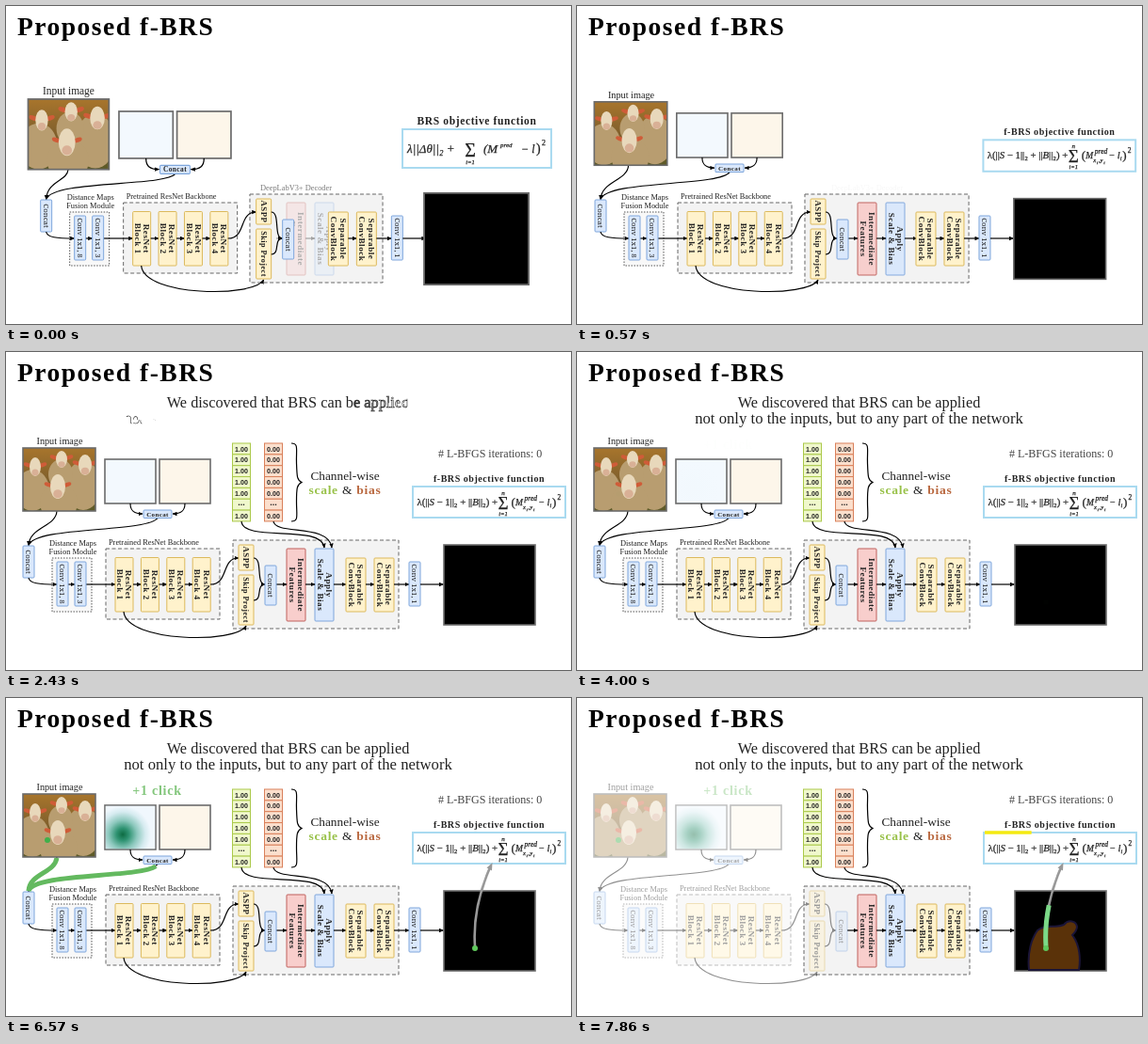
An HTML page that plays this animation: 600 px wide and 338 px high, repeating every 8 s.

```html
<!DOCTYPE html>
<html lang="en">
<head>
<meta charset="utf-8">
<title>Proposed f-BRS</title>
<style>
html, body { margin: 0; width: 100%; height: 100%; overflow: hidden; background: #fff; }
svg { display: block; width: 100vw; height: 100vh; }
text { font-family: "Liberation Serif", serif; fill: #222; white-space: pre; }
.n { font-family: "Noto Serif", serif; }
.b { font-weight: 700; letter-spacing: .055em; }
.m { text-anchor: middle; }
.i { font-style: italic; }
.math text { stroke: #222; stroke-width: .25; }
.yellow { fill: #fff2cc; stroke: #dcb95c; }
.blue { fill: #dae8fc; stroke: #7ea6dc; }
.red { fill: #f8cecc; stroke: #c0605c; }
.area { fill: #f3f3f3; stroke: #666; stroke-dasharray: 4 2.5; }
.dots { fill: #f8f8f8; stroke: #555; stroke-dasharray: 1.5 1.5; }
.frame { stroke: #6b6b6b; stroke-width: 1.6; }
.edge { fill: none; stroke: #000; stroke-width: 1.2; }
.flash { fill: none; stroke: #63b95f; stroke-width: 5; }
</style>
</head>
<body>
<svg id="stage" viewBox="0 0 600 338"></svg>
<script>
const LOOP = 8000;
const text = (s, x, y, size, cls = '', attrs = '') =>
  `<text x="${x}" y="${y}" font-size="${size}" class="${cls}" ${attrs}>${s}</text>`;
const rect = (x, y, w, h, cls, attrs = '') =>
  `<rect x="${x}" y="${y}" width="${w}" height="${h}" class="${cls}" ${attrs}/>`;
const ellipse = (x, y, rx, ry, fill, turn = 0) =>
  `<ellipse rx="${rx}" ry="${ry}" fill="${fill}" transform="translate(${x} ${y}) rotate(${turn})"/>`;
const edge = (d, id = '') => `<path id="${id}" class="edge" marker-end="url(#tip)" d="${d}"/>`;
const group = (id, body, attrs = '') => `<g id="${id}" ${attrs}>${body}</g>`;

// Box whose lines of text run downwards
const block = (x, y, w, h, cls, lines, font = 'b', size = 9.2) =>
  rect(x, y, w, h, cls, 'rx="1"') +
  `<g transform="translate(${x + w / 2} ${y + h / 2}) rotate(90)">` +
  lines.map((s, i) => text(s, 0, 2.7 + (i - (lines.length - 1) / 2) * 9.3, size, font + ' m')).join('') +
  '</g>';

const photo = '<g clip-path="url(#photoClip)">' + rect(0, 0, 77, 67, '', 'fill="url(#field)"') +
  [[10, 45, 18, 22], [64, 40, 19, 26], [40, 28, 13, 16], [38, 58, 20, 20]]
    .map(([x, y, rx, ry]) => ellipse(x, y, rx, ry, '#b89d70')).join('') +
  [[13, 20, 6, 10], [41, 12, 6, 9], [66, 18, 7, 11], [37, 41, 8, 13]].map(([x, y, rx, ry]) =>
    ellipse(x - rx - 2, y - 2, 4.5, 2.2, '#cf5c38', 20) + ellipse(x + rx + 2, y - 2, 4.5, 2.2, '#cf5c38', -20) +
    ellipse(x, y, rx, ry, '#e8d8bb') + ellipse(x, y + ry * .6, rx * .6, ry * .35, '#d9b096')).join('') +
  '</g>' + rect(0, 0, 77, 67, 'frame', 'fill="none"');

const maps =
  rect(105, 114, 54, 47, 'frame', 'fill="#f3f9fe"') + rect(163, 114, 54, 47, 'frame', 'fill="#fdf6ea"') +
  group('distance', rect(105.8, 114.8, 52.4, 45.4, '', 'fill="url(#halo)"')) +
  rect(146, 168, 30, 8.5, 'blue', 'rx="1"') + text('Concat', 161, 174.6, 7, 'b m') +
  edge('M132 161C132 169 136 172 145 172') + edge('M190 161C190 169 186 172 177 172');

const network =
  block(18, 206, 12, 34, 'blue', ['Concat'], 'n', 7.8) +
  rect(49, 219, 42, 57, 'dots') +
  text('Distance Maps', 71, 206, 8.4, 'm') + text('Fusion Module', 71, 214.5, 8.4, 'm') +
  rect(106, 209, 121, 75, 'area') + text('Pretrained ResNet Backbone', 109, 205, 8.3) +
  edge('M24 240C25 246 35 247 54 247') + edge('M66 247H73') + edge('M85 247H116') +
  block(54, 223, 12, 47, 'blue', ['Conv 1x1, 8'], 'n', 7.8) +
  block(73, 223, 12, 47, 'blue', ['Conv 1x1, 3'], 'n', 7.8) +
  [0, 1, 2, 3].map(i => {
    const x = 116 + 27.4 * i;
    return block(x, 218.5, 19, 57.5, 'yellow', ['ResNet', 'Block ' + (i + 1)]) +
      (i < 3 ? edge(`M${x + 19} 247H${x + 27.4}`) : '');
  }).join('') +
  edge('M217 247C237 247 228 219 247 219') + edge('M125 276C128 309 245 310 255 291') +
  block(247, 205, 16, 27, 'yellow', ['ASPP'], 'b', 8.8) +
  block(247, 237, 16, 53, 'yellow', ['Skip Project'], 'b', 8.2) +
  edge('M263 219C273 219 265 247 275 247') + edge('M263 264C273 264 265 247 275 247') +
  block(275, 227, 12, 42, 'blue', ['Concat'], 'n', 7.8);

const scaleBias =
  block(298, 209, 20, 77, 'red', ['Intermediate', 'Features']) +
  block(328, 209, 20, 77, 'blue', ['Apply', 'Scale &amp; Bias']) +
  edge('M287 247H298') + edge('M318 247H328') + edge('M348 247H361');

const head =
  block(361, 219, 21, 57, 'yellow', ['Separable', 'ConvBlock']) + edge('M382 247H391') +
  block(391, 219, 21, 57, 'yellow', ['Separable', 'ConvBlock']) + edge('M412 247H428') +
  block(428, 223, 12, 47, 'blue', ['Conv 1x1, 1'], 'n', 7.8) + edge('M440 247H464.5');

const column = (x, value, fill, stroke) => [...Array(7).keys()].map(i => {
  const y = 97 + 11.85 * i;
  return rect(x, y, 19, 11.85, '', `fill="${fill}" stroke="${stroke}"`) +
    text(i == 5 ? '...' : value, x + 9.5, y + (i == 5 ? 6.6 : 8.5), i == 5 ? 9 : 7.1, 'm',
      'style="font-family:\'Liberation Sans\',sans-serif;font-weight:700"');
}).join('');
const channels =
  column(240.5, '1.00', '#f0f8cc', '#abc94a') + column(274.5, '0.00', '#fbdfcd', '#d9805a') +
  '<path class="edge" d="M303 97C311 97 308 103 308.5 118S309 136 314 138.5C309 141 308.5 144 308.5 159S311 180 303 180"/>' +
  text('Channel-wise', 360, 136, 13.3, 'm') +
  text('<tspan fill="#98c148">scale</tspan><tspan font-weight="400"> &amp; </tspan><tspan fill="#b9683f">bias</tspan>', 360, 151, 13.5, 'b m') +
  edge('M250 180C252 203 335 182 338 208') + edge('M284 180C286 195 343 182 346 208') +
  text('# L-BFGS iterations: 0', 459, 112, 12, '', 'fill-opacity=".85"');

const sum = '<g class="math">' +
  text('λ(||<tspan class="i">S</tspan> − 1||₂ + ||<tspan class="i">B</tspan>||₂) +', 436.5, 163, 10.7) +
  text('Σ', 528, 167, 19, 'm') + text('n', 528, 151.5, 7, 'i m') + text('i=1', 528, 173.5, 6.5, 'i m') +
  text('(', 536.5, 163.5, 13) + text('M', 541, 163, 9.5, 'i') + text('pred', 550.5, 158, 7.5, 'i') +
  text('x', 549, 167, 6.5, 'i') + text('i', 552.5, 168.5, 5, 'i') + text(',y', 554.5, 167, 6.5, 'i') + text('i', 560, 168.5, 5, 'i') +
  text('−', 566, 163, 10) + text('l', 574.5, 163, 10.5, 'i') + text('i', 577.5, 165, 6.5, 'i') +
  text(')', 580, 163.5, 13) + text('2', 585.5, 156.5, 7.5) + '</g>';
const oldSum = '<g class="math">' + text('λ||Δθ||₂ +', 426, 156, 13, 'i') +
  text('Σ', 493, 160, 20, 'm') + text('i=1', 493, 168, 6.5, 'i m') +
  text('(M', 507, 156, 13, 'i') + text('pred', 525, 150, 7, 'i') + text('− l', 547, 156, 12, 'i') +
  text(')', 563, 156, 14) + text('2', 569, 148, 8) + '</g>';

const writing = [['We discovered that BRS can be applied', 59, 16.3],
  ['not only to the inputs, but to any part of the network', 76, 16.7]]
  .map(([s, y, size]) => text([...s].map(c => `<tspan${c == ' ' ? '' : ' class="pen"'}>${c}</tspan>`).join(''), 299.5, y, size, 'm')).join('');

const flash = (d, from, to) => `<path class="flash" pathLength="1" d="${d}" data-from="${from}" data-to="${to}"/>`;
const LINK = 'M498 264C496 235 503 205 514.5 179';
const flashes =
  flash('M54 169C53 186 25 186 24 205', 6250, 6880) + flash('M161 177C150 192 30 185 24 205', 6250, 6880) +
  flash('M24 240C25 246 35 247 54 247H217', 6760, 7080) +
  flash('M217 247C237 247 228 219 247 219', 6980, 7150) + flash('M125 276C128 309 245 310 255 291', 6900, 7150) +
  flash('M263 219C273 219 265 247 275 247H464', 7080, 7350) +
  flash('M263 264C273 264 265 247 275 247', 7080, 7250);

const stage = document.getElementById('stage');
stage.innerHTML = `<defs>
  <marker id="tip" markerUnits="userSpaceOnUse" markerWidth="5" markerHeight="5" refX="4.5" refY="2.5" orient="auto"><path d="M0 .3L5 2.5L0 4.7Z"/></marker>
  <clipPath id="photoClip"><path d="M0 0H77V67H0Z"/></clipPath>
  <linearGradient id="field" x2="0" y2="1"><stop stop-color="#a8752c"/><stop offset=".5" stop-color="#80602c"/><stop offset="1" stop-color="#5c5a28"/></linearGradient>
  <radialGradient id="halo" gradientUnits="userSpaceOnUse" cx="124" cy="145" r="30"><stop stop-color="#0d6b42"/><stop offset=".22" stop-color="#2f9372"/><stop offset=".5" stop-color="#8cc8bd"/><stop offset=".8" stop-color="#d6ebf0"/><stop offset="1" stop-color="#f0f7fd"/></radialGradient>
  </defs>` +
  text('Proposed f-BRS', 12, 31, 27.5, 'b', 'style="fill:#000"') +
  rect(241, 200, 176, 94, 'area', 'id="decoder"') +
  text('DeepLabV3+ Decoder', 308, 196, 8.4, 'm', 'id="decoderName"') +
  group('scaleBias', scaleBias) +
  group('inputs', edge('', 'photoEdge') + edge('', 'mapsEdge') +
    group('photo', photo) + text('Input image', 57, 98, 10.2, 'm', 'id="photoName"') +
    group('maps', maps) + group('network', network) +
    group('click', text('+1 click', 160.5, 103, 14, 'b m', 'style="fill:#83c67c"') +
      '<circle cx="44" cy="151" r="3" fill="#3fb04a"/>')) +
  group('head', head) + group('channels', channels) +
  group('output', rect(465, 205, 97, 85, 'frame', 'fill="#000"') +
    group('mask', '<path fill="#5a3209" stroke="#1b1538" stroke-width="2" d="M480 289C478 270 483 255 489 247C497 240 508 245 517 241C522 235 530 237 531 243C531 247 528 250 526 252C534 262 535 278 533 289Z"/>')) +
  rect(0, 0, 0, 0, '', 'id="lossBox" fill="#fff" stroke="#a9daf0" stroke-width="2"') +
  group('newLoss', text('f-BRS objective function', 513, 138, 10, 'b m') + sum) +
  group('oldLoss', text('BRS objective function', 500, 126, 11.5, 'b m') + oldSum) +
  writing + flashes +
  `<path id="link" fill="none" stroke="#999" stroke-width="2.6" pathLength="1" d="${LINK}"/>
  <path id="linkTip" fill="#999" d="M516.5 175L516 183.5L510.5 180.5Z"/>` +
  flash(LINK, 7660, 8460).replace('/>', ' style="stroke:#7bd987"/>') +
  '<circle id="dot" cx="498" cy="266" r="3" fill="#5fc75c"/>' +
  '<path id="outline" fill="none" stroke="#f4ea12" stroke-width="3.5" pathLength="390" d="M433 143H594V176H433Z"/>';

const $ = id => document.getElementById(id);
const clamp = v => Math.min(1, Math.max(0, v));
const sigmoid = x => 1 / (1 + Math.exp(-x));
const smooth = v => {
  const e = sigmoid(-5);
  return clamp((sigmoid(10 * (clamp(v) - .5)) - e) / (1 - 2 * e));
};
const ramp = (t, a, b) => smooth((t - a) / (b - a));
const fade = (id, v) => $(id).setAttribute('opacity', v);
const move = (id, s) => $(id).setAttribute('transform', s);
const pens = [...document.querySelectorAll('.pen')];
const flashPaths = [...document.querySelectorAll('.flash')];

function layout(t) {
  const p = smooth(.43 + t / 1500), p0 = smooth(.43);
  const k = (1 - p) / (1 - p0); // 1 = early arrangement, 0 = settled
  const dx = 18.7 * k;
  move('network', `translate(${dx})`);
  move('head', `translate(${-dx})`);
  move('photo', `translate(${18 + 5.5 * k} ${102 - 3 * k}) scale(${1 + .115 * k})`);
  move('photoName', `translate(${57 + 9.5 * k} ${98 - 4 * k}) scale(${1 + .12 * k}) translate(-57 -98)`);
  move('maps', `translate(${105 + 15 * k} ${114 - 2 * k}) scale(${1 + .0625 * k}) translate(-105 -114)`);
  move('output', `translate(${513.5 - 14 * k} 247.5) scale(${1 + .145 * k}) translate(-513.5 -247.5)`);
  $('photoEdge').setAttribute('d', `M${54 + 12 * k} ${169 + 5 * k}C${53 + 12 * k} 186 ${25 + dx} 186 ${24 + dx} 205.5`);
  $('mapsEdge').setAttribute('d', `M${161 + 19 * k} ${176.5 + 2 * k}C${150 + 19 * k} 192 ${30 + dx} 185 ${24 + dx} 205.5`);
  $('decoder').setAttribute('x', 241 + 18 * k);
  $('decoder').setAttribute('width', 176 - 35 * k);
  fade('decoderName', (1 - p) * .9);
  fade('scaleBias', p);
  const box = { x: 432 - 11 * k, y: 143 - 12 * k, width: 162 - 4 * k, height: 33 + 8 * k };
  for (const key in box) $('lossBox').setAttribute(key, box[key]);
  move('newLoss', `translate(${-13 * k} ${-10 * k})`);
  move('oldLoss', `translate(${13 * (1 - k)} ${10 * (1 - k)})`);
  fade('newLoss', clamp((p - .35) / .4));
  fade('oldLoss', clamp((.75 - p) / .4));
}

function write(t) {
  const lag = 12, pos = (t - 1730) / 1770 * (pens.length + lag);
  pens.forEach((pen, i) => {
    const u = clamp((pos - i) / lag);
    pen.style.fillOpacity = clamp(u * 2 - 1);
    pen.style.stroke = u > 0 && u < 1 ? '#222' : 'none';
    pen.style.strokeWidth = .6;
    pen.style.strokeDasharray = `${u * 50} 90`;
  });
}

function draw(now) {
  const t = now % LOOP;
  layout(t);
  write(t);
  fade('channels', ramp(t, 800, 1500));

  const click = ramp(t, 3950, 4750), link = ramp(t, 4200, 5000);
  fade('click', click);
  fade('distance', click);
  fade('dot', click);
  fade('link', link > .005 ? 1 : 0);
  $('link').setAttribute('stroke-dasharray', `${link} 2`);
  fade('linkTip', link > .97 ? 1 : 0);

  for (const path of flashPaths) {
    const u = (t - path.dataset.from) / (path.dataset.to - path.dataset.from);
    const end = clamp(u * 2), start = clamp(u * 2 - 1);
    path.setAttribute('opacity', end > start ? 1 : 0);
    path.setAttribute('stroke-dasharray', `0 ${start} ${end - start} 2`);
  }
  fade('mask', ramp(t, 7150, 7500));
  fade('inputs', 1 - .57 * ramp(t, 7350, 7850));
  const yellow = Math.max(0, t - 7700) * .31;
  fade('outline', yellow ? 1 : 0);
  $('outline').setAttribute('stroke-dasharray', `${yellow} 400`);
  requestAnimationFrame(draw);
}
requestAnimationFrame(draw);
</script>
</body>
</html>
```
